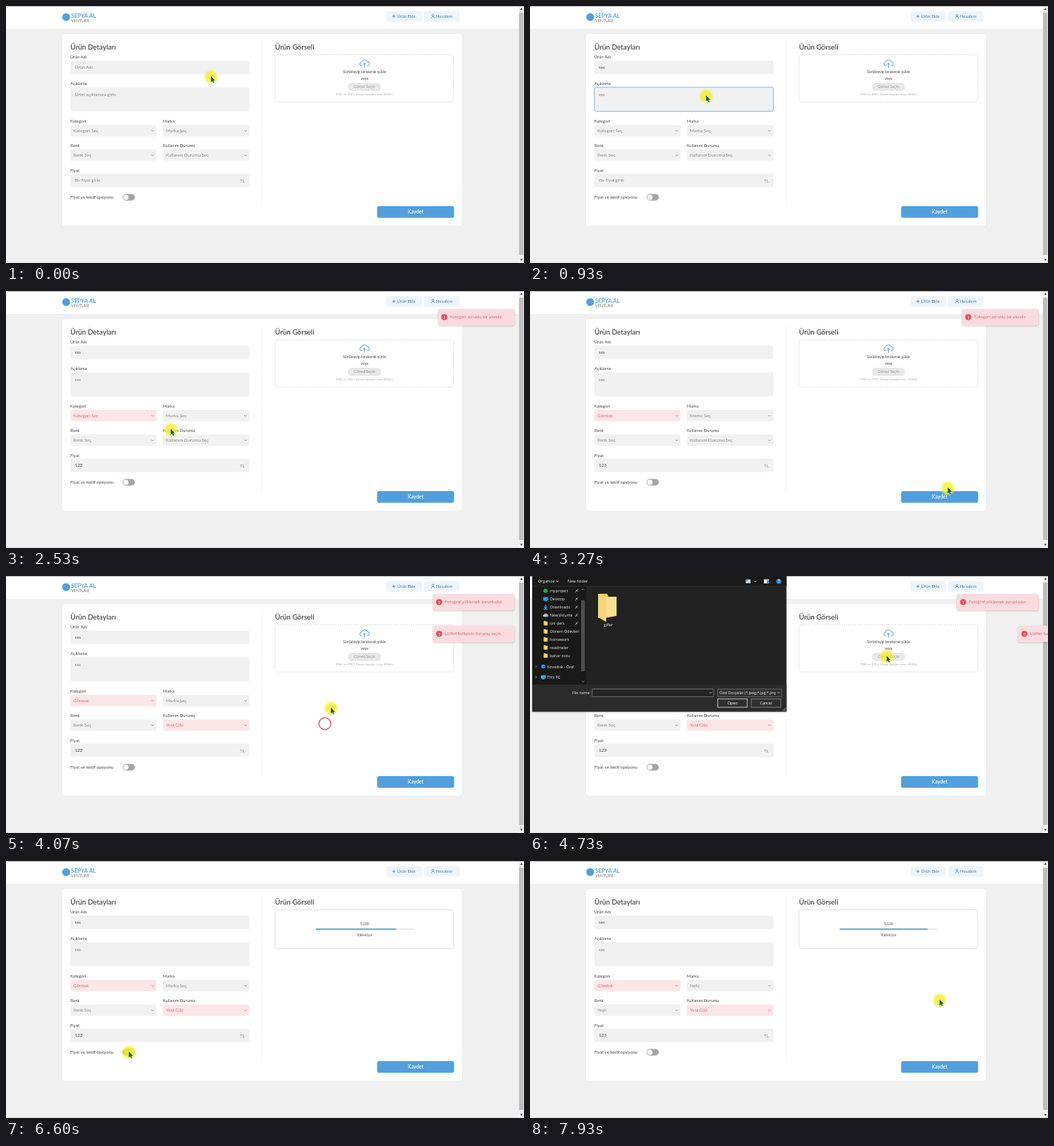
An HTML page for the animation above (8 s loop, 700x348 px).

```html
<!DOCTYPE html>
<html lang="tr">
<head>
<meta charset="utf-8">
<style>
html, body { margin: 0; width: 100%; height: 100%; overflow: hidden; background: #f0f0f0; }
svg { display: block; width: 700px; height: 348px; }
text { font-family: Lato, "Open Sans", sans-serif; white-space: pre; }
.dlg text { font-family: "Open Sans", "Noto Sans", sans-serif; }
</style>
</head>
<body>
<svg id="stage" viewBox="0 0 700 348" xmlns="http://www.w3.org/2000/svg"></svg>
<script>
const LOOP = 8000, STEP = 200 / 3;
const BLUE = '#519fdc', GREY = '#8b8b8b', INK = '#484848', RED = '#df6873', FIELD = '#f1f1f1', PINK = '#fce6e8';

const rect = (x, y, w, h, fill, r = 0, extra = '') =>
  `<rect x="${x}" y="${y}" width="${w}" height="${h}" fill="${fill}" rx="${r}" ${extra}/>`;
const text = (x, y, s, size, fill = INK, extra = '') =>
  `<text x="${x}" y="${y}" font-size="${size}" fill="${fill}" ${extra}>${s}</text>`;
const path = (d, stroke, w = 0.8, extra = '') =>
  `<path d="${d}" fill="none" stroke="${stroke}" stroke-width="${w}" ${extra}/>`;
const circle = (x, y, r, fill, extra = '') =>
  `<circle cx="${x}" cy="${y}" r="${r}" fill="${fill}" ${extra}/>`;
const group = (id, body, extra = '') => `<g id="${id}" ${extra}>${body}</g>`;
const MID = 'text-anchor="middle"';

function select(id, x, y, w, label) {
  return text(x, y - 3.5, label, 5.7) +
    rect(x, y, w, 15.5, FIELD, 2.5, `id="${id}Box"`) +
    text(x + 4, y + 9.8, '', 6.15, GREY, `id="${id}"`) +
    path(`M${x + w - 7} ${y + 7}l1.7 1.7l1.7 -1.7`, GREY, 0.8, `id="${id}Arrow"`);
}

function page() {
  return rect(0, 0, 700, 348, '#f0f0f0') + rect(0, 0, 693, 31, '#fff') +
    circle(81.3, 15, 5.3, BLUE) +
    text(88, 16, 'SEPYA AL', 7.7, BLUE, 'font-weight="600"') +
    text(88, 22, 'VENTURE', 5.4, '#777') +
    rect(514, 7, 48, 14.5, '#edf5fb', 2.5) + rect(565, 7, 48, 14.5, '#edf5fb', 2.5) +
    path('M522 14h4.4M524.2 11.8v4.4', '#3f82ba') +
    text(528.5, 16.2, 'Ürün Ekle', 5.8, '#3f82ba') +
    circle(577, 12.5, 1.3, 'none', 'stroke="#3f82ba" stroke-width=".7"') +
    path('M574.8 16.6c.2 -3 4.2 -3 4.4 0', '#3f82ba', 0.7) +
    text(581, 16.2, 'Hesabım', 5.8, '#3f82ba') +
    rect(76, 38, 540, 259.5, '#fff', 4) +
    path('M346 47V272', '#ededed', 0.8, 'stroke-dasharray="2 .6"') +
    text(87, 58.7, 'Ürün Detayları', 9.5, INK, 'font-weight="600"') +
    text(363.5, 58.7, 'Ürün Görseli', 9.5, INK, 'font-weight="600"') +
    text(87, 71, 'Ürün Adı', 5.7) + rect(87, 74, 242, 18.3, FIELD, 2.5, 'id="nameBox"') +
    text(93, 85.2, '', 6.15, GREY, 'id="name"') +
    text(87, 107, 'Açıklama', 5.7) + rect(87, 110, 242, 32.5, FIELD, 2.5, 'id="descBox"') +
    text(93, 121.7, '', 6.15, GREY, 'id="desc"') +
    select('cat', 87, 161, 116.5, 'Kategori') + select('brand', 212, 161, 117, 'Marka') +
    select('color', 87, 194.3, 116.5, 'Renk') + select('usage', 212, 194.3, 117, 'Kullanım Durumu') +
    text(87, 224.5, 'Fiyat', 5.7) + rect(87, 227, 242, 18.3, FIELD, 2.5, 'id="priceBox"') +
    text(93, 238.4, '', 6.15, GREY, 'id="price"') + text(316, 238.5, 'TL', 6.4, '#999') +
    text(87, 261, 'Fiyat ve teklif opsiyonu', 5.75) +
    rect(157.5, 254.6, 16.6, 8.8, '#a5a5a5', 4.4, 'id="track"') +
    circle(162, 259, 3.6, '#fff', 'id="knob"') +
    rect(501.5, 271, 104, 15.7, BLUE, 2.5) +
    text(553.5, 281.2, 'Kaydet', 6.8, '#fff', MID + ' font-weight="600"') +
    rect(693, 0, 7, 348, '#f1f1f1') + rect(693.3, 9, 6, 328, '#bdbdbd') +
    '<path d="M694.5 5l2 -2.4l2 2.4zM694.5 342.6l2 2.4l2 -2.4z" fill="#555"/>' +
    rect(0, 0, 700, 1, '#b9b9b9') + rect(0, 347, 693, 1, '#e3e3e3');
}

function uploads() {
  const drop = rect(363.5, 66, 241.5, 64, '#fff', 3.5, 'stroke="#d5d5d5" stroke-width=".8" stroke-dasharray="2 1"') +
    path('M481.3 81h-.5a2.5 2.5 0 0 1 -.2 -5a3.9 3.9 0 0 1 7.5 -.7a2.8 2.8 0 0 1 .3 5.6h-.8M484.3 83.4v-6M482.3 79.3l2 -2l2 2', '#4d98cf', 0.9) +
    text(484.5, 91, 'Sürükleyip bırakarak yükle', 5.1, INK, MID) +
    text(484.5, 100, 'veya', 5.1, INK, MID) +
    rect(462, 104, 45, 11, '#e8e8e8', 5.5) +
    text(484.5, 111.3, 'Görsel Seçin', 5.3, '#9a9a9a', MID) +
    text(484.5, 121.4, 'PNG ve JPEG Dosya boyutu: max. 800kb', 4.3, '#b0b0b0', MID);
  const bar = rect(363.5, 66, 241.5, 52.7, '#fff', 3.5, 'stroke="#d9d9d9" stroke-width=".8"') +
    text(484.5, 86.7, '%100', 4.9, '#555', MID) +
    rect(418.5, 91.6, 131.5, 1.5, '#dfe3e6', 0.7) + rect(418.5, 91.4, 0, 1.8, BLUE, 0.8, 'id="bar"') +
    text(484.5, 101.6, 'Yükleniyor', 4.7, '#555', MID);
  return group('drop', drop) + group('progress', bar);
}

function popup() {
  return group('popup', rect(132, 249.3, 33, 36.7, '#484848', 2.5) +
    '<path d="M139 249.5l3 -3.3l3 3.3z" fill="#484848"/>' +
    text(137.8, 262, '123', 5.8, '#e8e8e8') + text(137.8, 277.7, '1231', 5.8, '#e8e8e8'));
}

function toast(id, x, msg) {
  return group(id, rect(x, 24.3, 687 - x, 22, '#fadcdf', 2, 'filter="url(#shade)"') +
    circle(x + 8.3, 35.3, 4.1, '#e2525f') +
    text(x + 8.3, 37.5, '!', 6, '#fff', MID + ' font-weight="700"') +
    text(x + 16, 37.4, msg, 5.9, RED));
}

const folder = (x, y) => rect(x, y - 3, 2.6, 6, '#e3b94c') + rect(x + 1, y - 2.2, 4.2, 5.2, '#fadb7c');

function dialog() {
  const rows = ['myproject', 'Desktop', 'Downloads', 'New Volume', 'üni ders',
    'Dönem Ödevleri', 'homework', 'readmeler', 'bahar notu'];
  const icons = [
    y => circle(21, y, 2.8, '#35a853'),
    y => rect(18, y - 2.5, 6.5, 4.6, '#2f9be8', 0.5) + rect(19.5, y + 2.4, 3.5, 0.8, '#9bd'),
    y => path(`M21 ${y - 3}v4.5M19 ${y - 0.3}l2 2l2 -2M18.3 ${y + 3}h5.4`, '#3ba4ec', 1.1),
    y => rect(18, y - 0.5, 6.5, 2.8, '#b9bec2', 0.6) + rect(19, y - 1.6, 4.5, 1.1, '#e7e7e7')
  ];
  let s = rect(3, 0, 343.5, 183.5, '#202020', 0, 'filter="url(#shade)"') +
    rect(3, 0, 343.5, 14, '#191919') + rect(3, 14, 73, 133, '#191919') +
    rect(3, 147, 343.5, 36.5, '#2b2b2b') + rect(3, 13.6, 343.5, 0.6, '#3c3c3c') +
    text(11, 9.2, 'Organize', 5.3, '#eee') + path('M35.5 6.5l1.6 1.6l1.6 -1.6', '#ddd') +
    text(51, 9.2, 'New folder', 5.3, '#eee') +
    rect(291.5, 4.7, 6.5, 5, '#dfe8ef') + rect(292, 5.4, 2.5, 2, '#3f9bd8') +
    path('M303 6.5l1.5 1.5l1.5 -1.5', '#ddd') +
    rect(316, 4.5, 7, 5.6, '#eee') + rect(320, 5.5, 3, 4.6, '#3f9bd8') +
    circle(336.2, 7.3, 3.5, '#2388d5') + text(336.2, 9.4, '?', 5.4, '#fff', MID + ' font-weight="700"') +
    rect(3, 102.2, 66, 10.8, '#6d6d6d', 0, 'id="picked"');
  rows.forEach((name, i) => {
    const y = 20 + i * 10.95;
    s += (icons[i] ? icons[i](y) : folder(18.5, y)) + text(27, y + 2, name, 5.2, '#eee');
    if (i < 5) s += path(`M61 ${y + 2.3}l2 -2M62 ${y - 1}l2.3 2.3M63 ${y - 0.2}l1.5 -1.7`, '#bbb', 0.9);
  });
  s += circle(18, 122.5, 2.8, '#2b8ee0') + text(23.2, 124.5, 'Kovadisk - Özel', 5.2, '#eee') +
    rect(15, 134.6, 6, 4.2, '#4ab0e8', 0.5) + rect(16.5, 139.2, 3, 0.8, '#bcd') +
    text(23.2, 139.2, 'This PC', 5.2, '#eee') +
    path('M7.5 120.8l1.6 1.7l-1.6 1.7M7.5 135.3l1.6 1.7l-1.6 1.7', '#999') +
    rect(69, 14, 5.5, 133, '#181818') + rect(69, 33, 5.3, 96, '#4d4d4d') +
    path('M70 19l1.7 -1.7l1.7 1.7M70 142l1.7 1.7l1.7 -1.7', '#aaa') +
    '<path d="M92 24h12l1.5 2v29l-13.5 2z" fill="#e9c866"/><path d="M97 28h20v26l-14 2.5v5l-6 -4z" fill="#f9df8e"/>' +
    '<path d="M92 24l11 5v33l-11 -6z" fill="#f4d67b"/>' +
    text(106, 68.2, 'gifler', 5.2, '#eee', MID) +
    text(57, 160.2, 'File name:', 5.2, '#eee') +
    rect(84, 153, 164, 10.3, '#242424', 0, 'stroke="#8a8a8a" stroke-width=".7"') +
    path('M242.7 157.3l1.5 1.5l1.5 -1.5', '#ccc') +
    rect(253.5, 153, 86.5, 10.3, '#303030', 0, 'stroke="#777" stroke-width=".7"') +
    '<svg x="254" y="152" width="78" height="12">' + text(2, 8.2, 'Özel Dosyalar (*.jpeg;*.jpg;*.png)', 5.1, '#eee') + '</svg>' +
    path('M334.5 157.3l1.5 1.5l1.5 -1.5', '#ccc') +
    rect(253.7, 166.3, 40, 11.5, '#303030', 0, 'stroke="#ddd" stroke-width=".8"') +
    text(273.7, 174.1, 'Open', 5.3, '#fff', MID) +
    rect(299, 166.3, 40, 11.5, '#303030', 0, 'stroke="#999" stroke-width=".7"') +
    text(319, 174.1, 'Cancel', 5.3, '#fff', MID) +
    path('M341.5 182.5l4 -4M343.5 182.5l2 -2', '#aaa');
  return group('dialog', s, 'class="dlg"');
}

const stage = document.getElementById('stage');
stage.innerHTML = `<defs>
  <filter id="shade" x="-10%" y="-30%" width="120%" height="170%"><feDropShadow dx="0" dy="1" stdDeviation="1.3" flood-opacity=".25"/></filter>
  <radialGradient id="glow"><stop offset=".6" stop-color="#f3ef35" stop-opacity=".85"/><stop offset="1" stop-color="#f6f25c" stop-opacity=".1"/></radialGradient>
  </defs>` + page() + uploads() + popup() +
  toast('needCat', 584, 'Kategori zorunlu bir alandır.') +
  toast('needUsage', 577, 'Lütfen kullanım durumu seçin.') +
  toast('needPhoto', 577, 'Fotoğraf yüklemek zorunludur.') + dialog() +
  group('cursor', circle(0, 0, 10.5, 'url(#glow)') + circle(0, 0, 6.3, 'none', 'id="press" stroke="#77762a" stroke-width="1.2"') +
    '<path d="M0 -1v8l1.8 -1.5l1.2 2.5l1.3 -.6l-1.2 -2.4l2.3 -.2z" fill="#155868"/>') +
  circle(0, 0, 8, 'none', 'id="ring" stroke="#b8434b" stroke-width="1.1"');

const el = {};
stage.querySelectorAll('[id]').forEach(e => el[e.id] = e);
const set = (id, attrs) => { for (const k in attrs) el[id].setAttribute(k, attrs[k]); };
const show = (id, on) => set(id, { visibility: on ? 'visible' : 'hidden' });

// Pointer route: time, x, y
const route = [[0, 277, 96], [200, 252, 84], [500, 252, 84], [680, 238, 122], [1000, 238, 122],
  [1200, 220, 236], [1600, 220, 236], [1840, 447, 191], [1880, 447, 191], [2220, 553, 277],
  [2300, 553, 277], [2620, 150, 168], [2720, 150, 168], [2860, 135, 186], [2920, 135, 186],
  [3267, 564.5, 267], [3330, 560, 277], [3500, 275, 202], [3560, 275, 202], [3650, 250, 218],
  [3700, 250, 218], [3840, 552, 277], [3880, 552, 277], [3980, 431, 200], [4067, 439, 179],
  [4400, 484, 109], [4700, 484, 109], [5540, 36, 108], [5590, 36, 108], [5667, 72.5, 98.5],
  [5800, 105, 43], [5860, 105, 43], [5980, 273, 172], [6060, 273, 172], [6360, 166, 259],
  [6730, 166, 259], [6880, 270, 168], [6940, 270, 168], [7050, 245, 188], [7110, 245, 188],
  [7210, 150, 202], [7260, 150, 202], [7360, 135, 224], [7420, 135, 224], [7660, 551, 277],
  [7720, 551, 277], [7867, 552, 214], [7933, 553.5, 188.5], [8000, 553, 178]];
const clicks = [210, 690, 1210, 1850, 2240, 2640, 2870, 3335, 3510, 3660, 3850, 3980, 4440,
  5575, 5810, 5990, 6380, 6680, 6890, 7060, 7220, 7370, 7670];

const clamp = v => Math.max(0, Math.min(1, v));
const ease = v => v * v * (3 - 2 * v);
const ramp = (t, a, b) => ease(clamp((t - a) / (b - a)));

function pointer(t) {
  const i = Math.max(1, route.findIndex(p => p[0] >= t));
  const [a, b] = [route[i - 1], route[i]], k = ramp(t, a[0], b[0]);
  return [a[1] + (b[1] - a[1]) * k, a[2] + (b[2] - a[2]) * k];
}

function field(id, t, hint, value, from, gap, focusEnd, ink) {
  const n = Math.max(0, Math.min(value.length, Math.floor((t - from) / gap) + 1));
  const focus = t >= from - 90 && t < focusEnd;
  el[id].textContent = n ? value.slice(0, n) : hint;
  set(id, { fill: n ? ink : GREY });
  set(id + 'Box', { stroke: focus ? '#63a9dd' : 'none', 'stroke-width': 0.8,
    fill: focus && id === 'price' ? '#eaf1fb' : FIELD });
}

function choice(id, t, hint, value, at, errorAt = Infinity) {
  const bad = t >= errorAt;
  el[id].textContent = t >= at ? value : hint;
  set(id, { fill: bad ? RED : GREY });
  set(id + 'Arrow', { stroke: bad ? RED : GREY });
  set(id + 'Box', { fill: bad ? PINK : FIELD });
}

function slide(id, t, from, to, pushed) {
  show(id, t >= from && t < to);
  const x = 120 * (1 - ramp(t, from, from + 180) + ramp(t, to - 180, to));
  set(id, { transform: `translate(${x} ${43 * ramp(t, pushed, pushed + 100)})` });
}

function draw(t) {
  field('name', t, 'Ürün Adı', 'sss', 300, 67, 690, INK);
  field('desc', t, 'Ürün açıklaması girin', 'sss', 780, 67, 1210, '#777');
  field('price', t, 'Bir fiyat girin', '123', 1300, 100, 1910, INK);
  show('popup', t >= 1230 && t < 1910);

  choice('cat', t, 'Kategori Seç', 'Gömlek', 2880, 2270);
  choice('usage', t, 'Kullanım Durumu Seç', 'Yeni Gibi', 3670, 3360);
  choice('brand', t, 'Marka Seç', 'Nelu', 7070);
  choice('color', t, 'Renk Seç', 'Yeşil', 7380);

  slide('needCat', t, 2270, 3700, 3360);
  slide('needUsage', t, 3360, 4800, 3870);
  slide('needPhoto', t, 3870, 5200, 9000);

  show('dialog', t >= 4500 && t < 6050);
  show('picked', t >= 5580 && t < 6050);
  show('drop', t < 6060);
  show('progress', t >= 6060);
  set('bar', { width: 109 * Math.sqrt(clamp((t - 6060) / 450)) + 10 * clamp((t - 6600) / 1333) });

  const on = ramp(t, 6380, 6460) - ramp(t, 6690, 6770);
  set('knob', { cx: 162 + 7.7 * on });
  set('track', { fill: on > 0.5 ? '#78b65a' : '#a5a5a5' });

  const [x, y] = pointer(t);
  set('cursor', { transform: `translate(${x} ${y})` });
  const hit = clicks.filter(c => c <= t).pop(), age = hit === undefined ? 999 : t - hit;
  show('press', age < 60);
  show('ring', age >= 60 && age < 170);
  if (age < 170) {
    const [cx, cy] = pointer(hit);
    set('ring', { cx, cy, r: 7 + age / 80, opacity: clamp((200 - age) / 100) });
  }
}

const start = performance.now();
function tick() {
  const t = (performance.now() - start) % LOOP;
  draw(Math.floor((t + 5) / STEP) * STEP);
  requestAnimationFrame(tick);
}
draw(0);
tick();
</script>
</body>
</html>
```
